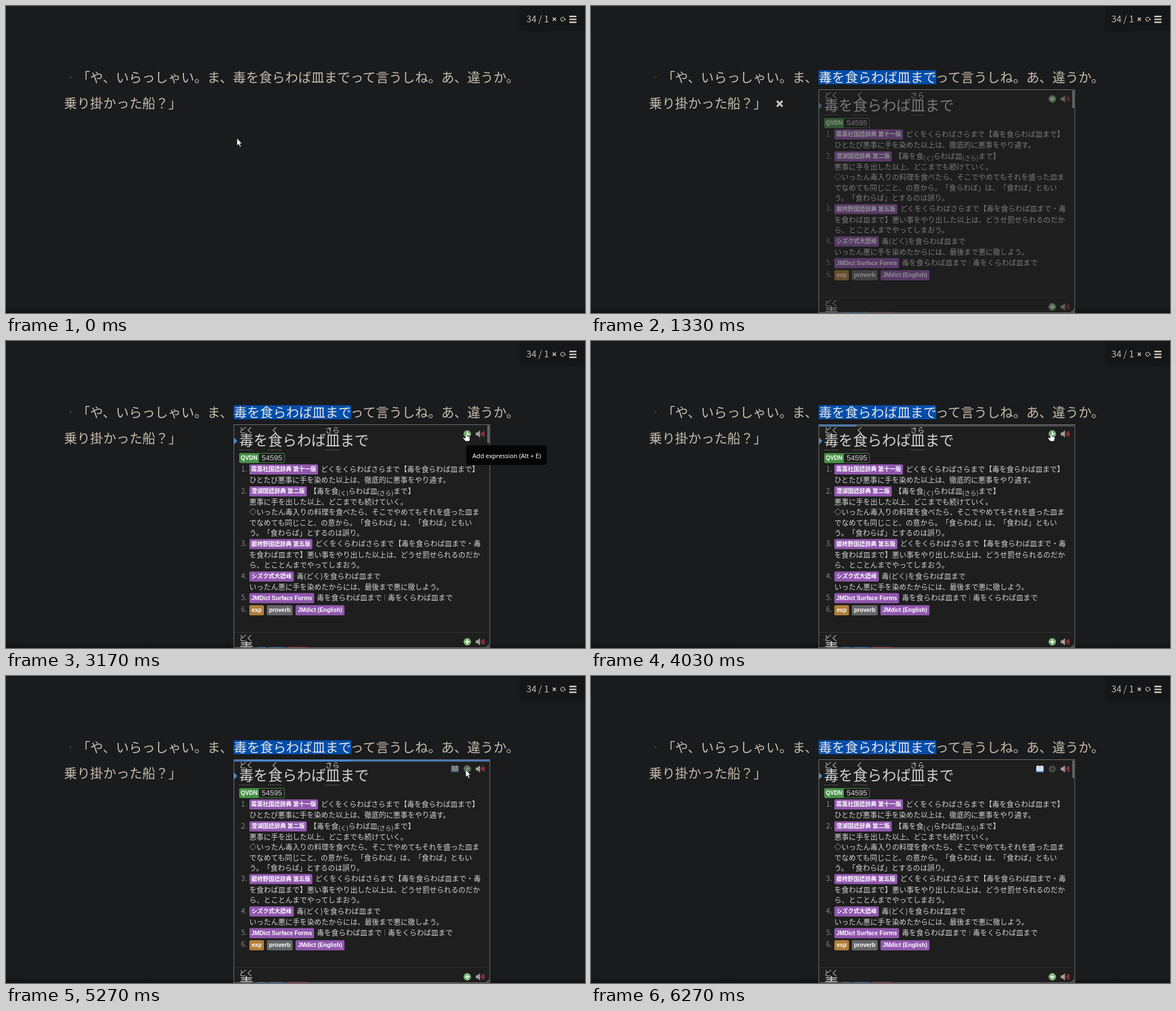
Recreate the animation shown at these times as an HTML page. Size 1028x545 px, loop 7.01 s.

```html
<!DOCTYPE html>
<html lang="ja">
<head>
<meta charset="utf-8">
<title>Popup dictionary</title>
<style>
html, body { margin: 0; height: 100%; overflow: hidden; background: #1a1b1d; }
svg { display: block; width: 100vw; height: 100vh; }
text { font-family: "Noto Sans CJK JP", "Noto Sans CJK", sans-serif; white-space: pre; text-spacing-trim: space-all; }
.story { font-size: 23.2px; font-weight: 300; fill: #c6bcac; }
.head { font-size: 25.6px; fill: #d4d4d4; }
.ruby { font-size: 12.8px; fill: #d4d4d4; text-anchor: middle; }
.body { font-size: 12.8px; fill: #d4d4d4; }
.num { font-size: 12.8px; fill: #888; text-anchor: end; }
.tag { font: bold 10.24px "Liberation Sans", "Noto Sans CJK JP", sans-serif; fill: #fff; text-anchor: middle; }
.freq { font: 13px "Liberation Sans", sans-serif; fill: #d4d4d4; }
.tip { font: 11.1px "Noto Sans", sans-serif; fill: #fff; }
</style>
</head>
<body>
<svg id="stage" viewBox="0 0 1028 545"></svg>
<script>
const PURPLE = '#9057ad';
const text = (cls, x, y, s) => `<text class="${cls}" x="${x}" y="${y}">${s}</text>`;
const rect = (x, y, w, h, fill, more = '') =>
  `<rect x="${x}" y="${y}" width="${w}" height="${h}" fill="${fill}" ${more}/>`;
const path = (d, fill, more = '') => `<path d="${d}" fill="${fill}" ${more}/>`;
const group = (id, inner, more = '') => `<g id="${id}" ${more}>${inner}</g>`;
const at = (x, y, inner) => `<g transform="translate(${x} ${y})">${inner}</g>`;
const tag = (x, y, w, s, fill = PURPLE) =>
  rect(x, y - 9, w, 18, fill, 'rx="2.5"') + text('tag', x + w / 2, y + 3, s);
const ruby = (x, y, s) => text('ruby', x, y, s);
const cross = (r, w) => path(`M${-r} ${-r}Q0 0 ${r} ${r}M${r} ${-r}Q0 0 ${-r} ${r}`, 'none', `stroke="#d0c8ba" stroke-width="${w}"`);
const sub = s => `<tspan font-size="10.67" dy="3">${s}</tspan><tspan dy="-3">&#8203;</tspan>`;

const plus = (fill, ring, mark) =>
  `<circle r="6" fill="${fill}" stroke="${ring}"/>` +
  path('M-3.5 0H3.5M0-3.5V3.5', 'none', `stroke="${mark}" stroke-width="2"`);
const greenPlus = plus('#6fb56a', '#a4d49c', '#fff');
const speaker =
  path('M-7-2.5h3l4.500-4v13l-4.500-4h-3z', '#a0a0a0') +
  path('M2.500-2Q4 0 2.500 2M4.500-3.500Q7 0 4.500 3.500M6.500-5Q9.500 0 6.500 5', 'none', 'stroke="#c24040" stroke-width="1.400"');
const book =
  rect(-7, -5, 14, 11, '#3f78b8', 'rx="1"') +
  path('M-6-5Q-2-7 0-4.500Q2-7 6-5V4Q2 2.500 0 5Q-2 2.500-6 4Z', '#e9eef4') +
  path('M0-4.500V5M-4.500-2.500H-1.500M-4.500 0H-1.500M1.500-2.500H4.500M1.500 0H4.500', 'none', 'stroke="#8fa9c4" stroke-width=".8"');

const page =
  rect(0, 0, 1028, 545, '#1a1b1d') +
  `<linearGradient id="shade" x2="0" y2="1"><stop stop-color="#111" stop-opacity="0"/><stop offset="1" stop-color="#111"/></linearGradient>` +
  rect(0, 535, 1028, 10, 'url(#shade)') +
  rect(912, 0, 116, 45, '#151618') +
  `<text x="924" y="29" font-size="16" font-weight="300" fill="#c6bcac">34 / 1</text>` +
  at(973.5, 23.5, cross(2.8, 1.7)) +
  at(988.5, 23.5, path('M2.200 2.600A3.500 3.500 0 1 1 3.300-1', 'none', 'stroke="#c6bcac" stroke-width="1.300"') + path('M1.200-.5H5V2.800Z', '#c6bcac')) +
  [17.2, 22.4, 27.6].map(y => rect(1000, y, 13, 2.7, '#d0c8ba', 'rx="1"')).join('') +
  text('story', 103, 135, '<tspan fill="#303133">・</tspan>「や、いらっしゃい。ま、毒を食らわば皿までって言うしね。あ、違うか。') +
  text('story', 103, 181, '乗り掛かった船？」') +
  group('close', cross(5, 3.2), 'transform="translate(335 173.5)"') +
  group('selection', rect(404, 114, 209, 25, '#004daa') +
    text('story', 404.6, 135, '<tspan fill="#e8e6e3">毒を食らわば皿まで</tspan>'));

// x, baseline, text
const lines = [
  [559, 232, 'どくをくらわばさらまで【毒を食らわば皿まで】'],
  [432, 251, 'ひとたび悪事に手を染めた以上は、徹底的に悪事をやり通す。'],
  [539, 271, `【毒を食${sub('(く)')}らわば皿${sub('(さら)')}まで】`],
  [432, 290, '悪事に手を出した以上、どこまでも続けていく。'],
  [432, 308, '◇いったん毒入りの料理を食べたら、そこでやめてもそれを盛った皿ま'],
  [432, 326.5, 'でなめても同じこと、の意から。「食らわば」は、「食わば」ともい'],
  [432, 345, 'う。「食わらば」とするのは誤り。'],
  [549, 364, 'どくをくらわばさらまで【毒を食らわば皿まで・毒'],
  [432, 384, 'を食わば皿まで】悪い事をやり出した以上は、どうせ罰せられるのだか'],
  [432, 402, 'ら、とことんまでやってしまおう。'],
  [516, 422, '毒(どく)を食らわば皿まで'],
  [432, 441, 'いったん悪に手を染めたからには、最後まで悪に徹しよう。'],
  [552, 460, '毒を食らわば皿まで'],
  [678, 460, '毒をくらわば皿まで'],
];
const dots = x => path(`M${x} 193.500h25.500`, 'none', 'stroke="#777" stroke-dasharray="2 1.500"');

const content =
  ruby(426.7, 162.5, 'どく') + ruby(477.5, 162.5, 'く') + ruby(579.6, 162.5, 'さら') +
  text('head', 414, 186, '毒を食らわば皿まで') +
  dots(414) + dots(465) + dots(567) +
  path('M405 171.500L410.500 177.500L405 183.500Z', '#4a90d9') +
  rect(414.5, 199.5, 80, 16.5, '#1e1e1e', 'rx="2.5" stroke="#489148"') +
  rect(414, 199, 35, 17.5, '#489148', 'rx="2.5"') +
  text('tag', 431.5, 211, 'QVDN') + text('freq', 454, 212, '54595') +
  [232, 271, 364, 422, 460, 481].map((y, i) => text('num', 428, y, i + 1 + '.')).join('') +
  lines.map(line => text('body', ...line)).join('') +
  tag(432, 228, 122, '霧葉社国語辞典 第十一版') +
  tag(432, 267, 102, '澄湖国語辞典 第二版') +
  tag(432, 360.5, 112, '銀柊野国語辞典 第五版') +
  tag(432, 418, 79, 'シズク式大語峰') +
  tag(432, 456.5, 115, 'JMDict Surface Forms') +
  rect(672, 450, 1, 11, '#666') +
  tag(432, 478, 26, 'exp', '#b07f39') +
  tag(463, 478, 46, 'proverb', '#656667') +
  tag(514, 478, 87, 'JMdict (English)') +
  rect(405, 517, 454, 1, '#333') +
  ruby(426.7, 531.5, 'どく') + text('head', 414, 555, '毒') +
  rect(446, 543, 15, 1.5, '#2c5f8f') + rect(467, 543, 26, 1.5, '#2c5f8f') + rect(499, 543, 34, 1.5, '#843f3f') +
  at(797, 165, group('book', book)) +
  at(819, 165, group('used', plus('#4b4b4b', '#444', '#2c2c2c')) + group('add', greenPlus)) +
  at(841, 165, speaker) + at(819, 534, greenPlus) + at(841, 534, speaker);

const popup = group('popup',
  rect(404.5, 148.5, 454.5, 396, '#1e1e1e', 'stroke="#747474"') +
  group('content', content) +
  path('M859 536V544.500H850Z', '#4a4a4a') +
  group('thumb', rect(854.5, 150, 3.5, 31, '#666')) +
  group('progress', rect(404, 149, 455, 3, '#484848') +
    [0, 1].map(i => rect(404, 148.5, 0, 3.5, '#4a90e2', `id="bar${i}" opacity=".65"`)).join('')));

const tooltip = group('tooltip',
  rect(817, 185, 143, 35, '#050505', 'rx="4"') + text('tip', 828, 207.5, 'Add expression (Alt + E)'));

const outline = 'stroke="#111" stroke-width=".8"';
const cursor = group('cursor',
  group('arrow', path('M0 0V13.500L3 10.800L5.300 15.700L7.500 14.700L5.200 9.900H9Z', '#fff', outline)) +
  group('beam', path('M-3-7H-1L0-6L1-7H3M0-6V6M-3 7H-1L0 6L1 7H3', 'none', 'stroke="#eee" stroke-width="1"')) +
  group('hand', path('M-1.500-1Q0-3 1.500-1V3L5.500 4Q7 4.500 7 7L6 12H-1L-5.500 6.500Q-5 4.500-3 5.500L-1.500 7Z', '#fff', outline)));

const $ = id => document.getElementById(id);
$('stage').innerHTML = page + popup + tooltip + cursor;

const LOOP = 7010;
const clamp = u => Math.min(1, Math.max(0, u));
const ramp = (t, a, b) => clamp((t - a) / (b - a));
const linear = u => u, easeIn = u => u * u, easeOut = u => u * (2 - u);
const smooth = u => (1 - Math.cos(Math.PI * clamp(u))) / 2;
const fade = (id, v) => $(id).setAttribute('opacity', v);
const show = (id, on) => $(id).setAttribute('visibility', on ? 'visible' : 'hidden');

// time, x, y, easing used to get there
const route = [
  [0, 410, 234.5], [330, 410, 234.5], [1000, 420, 127, smooth], [1800, 420, 127],
  [2130, 735, 187, easeIn], [2470, 807, 166, easeOut], [2600, 807, 166], [2670, 817, 166],
  [5480, 816, 166], [5770, 640, 173, easeIn], [5830, 609, 164], [6270, -20, -18], [LOOP, -20, -18],
];
function pointer(t) {
  const i = route.findIndex(k => k[0] > t);
  const [t0, x0, y0] = route[i - 1], [t1, x1, y1, ease = linear] = route[i];
  const u = ease((t - t0) / (t1 - t0));
  return [x0 + (x1 - x0) * u, y0 + (y1 - y0) * u];
}

function draw(t) {
  const open = t >= 1200;
  show('selection', open);
  fade('popup', ramp(t, 1180, 1260));
  fade('content', ramp(t, 1230, 1430));
  show('tooltip', t >= 3170 && t < 3600);

  const [x, y] = pointer(t);
  const overPopup = open && x > 404 && x < 860 && y > 148;
  const overPage = !overPopup && x > 103 && x < 925;
  const onText = overPage && (y > 113 && y < 141 || y > 160 && y < 186 && x < 311);
  const shape = t >= 2630 && t < 5200 ? 'hand' : onText ? 'beam' : 'arrow';
  $('cursor').setAttribute('transform', `translate(${x} ${y})`);
  for (const s of ['hand', 'beam', 'arrow']) show(s, s === shape);
  show('close', overPage && y > 103 && y < 197);

  const added = ramp(t, 5200, 5340);
  fade('book', added);
  fade('used', added);
  fade('add', 1 - added);

  show('thumb', t < 3600 || t >= 5330);
  fade('progress', ramp(t, 3600, 3730) * (1 - ramp(t, 5300, 5450)));
  for (const i of [0, 1]) {
    const age = t - 3763 - i * 1000;
    const left = smooth((age - 1370) / 1070), right = smooth(age / 1070);
    $('bar' + i).setAttribute('x', 404 + 455 * left);
    $('bar' + i).setAttribute('width', 455 * (right - left));
  }
}

const start = performance.now();
function tick() {
  draw((performance.now() - start) % LOOP);
  requestAnimationFrame(tick);
}
tick();
</script>
</body>
</html>
```
